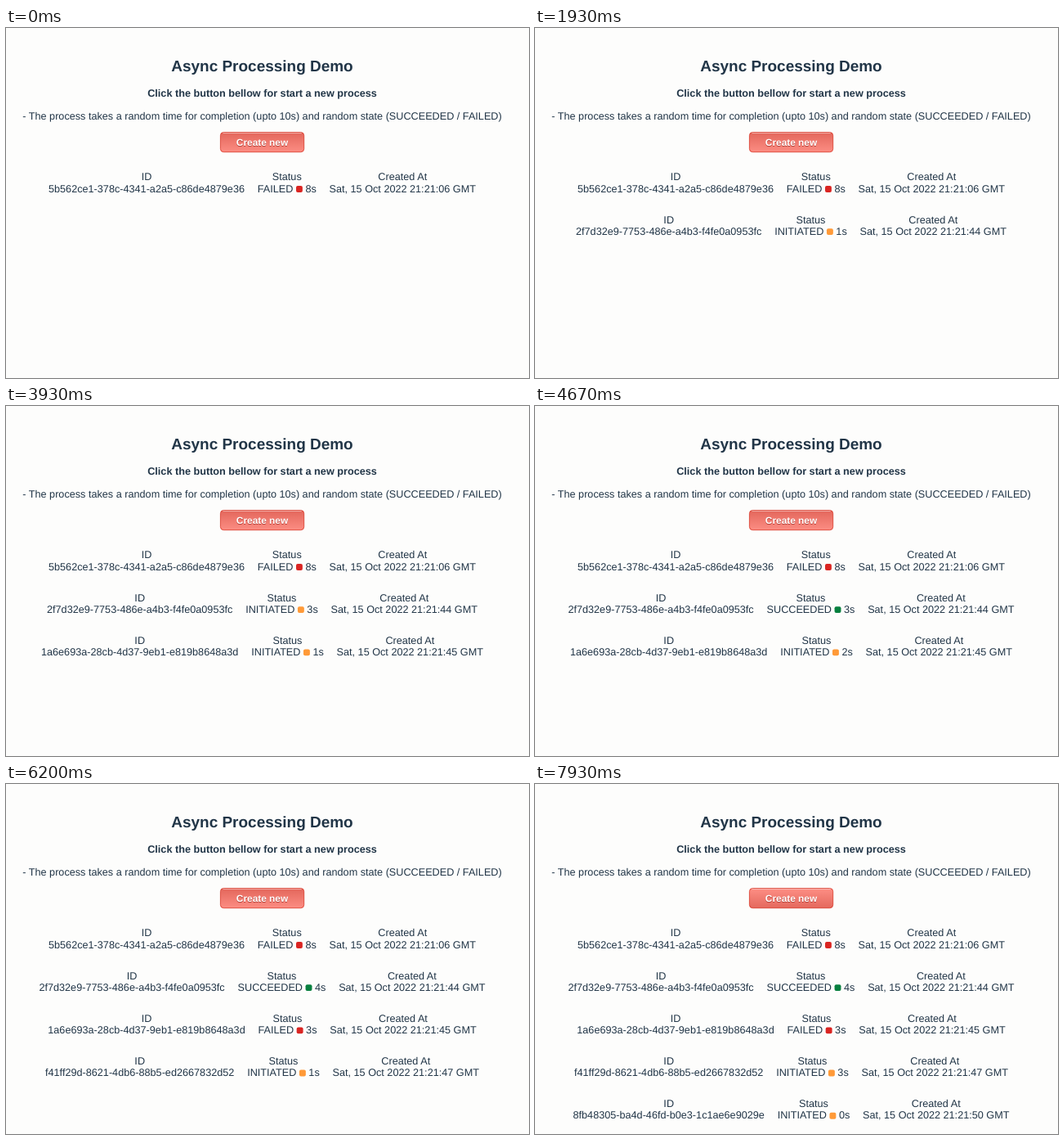
Animation of 640x428 px, one loop 8 s. Source, as an HTML page:

```html
<!DOCTYPE html>
<html lang="en">
<head>
<meta charset="utf-8">
<title>Async Processing Demo</title>
<style>
  html, body { margin: 0; width: 100%; height: 100%; overflow: hidden; background: #fdfdfc; }
  svg { display: block; width: 640px; height: 428px; }
  text {
    font: 12.66px "Liberation Sans", Arial, sans-serif;
    fill: #213547;
    text-rendering: geometricPrecision;
  }
  .mid { text-anchor: middle; }
  .bold { font-weight: 700; }
  .title { font-size: 18.98px; }
  .label { font-size: 11.86px; font-weight: 700; fill: #fff; }
  .shade { fill: #b23e35; }
</style>
</head>
<body>
<svg viewBox="0 0 640 428">
  <defs>
    <linearGradient id="idle" x1="0" y1="0" x2="0" y2="1">
      <stop offset=".05" stop-color="#fc8d83"/><stop offset="1" stop-color="#e4685d"/>
    </linearGradient>
    <linearGradient id="hover" x1="0" y1="0" x2="0" y2="1">
      <stop offset=".05" stop-color="#e4685d"/><stop offset="1" stop-color="#fc8d83"/>
    </linearGradient>
  </defs>
  <text class="mid bold title" x="313.5" y="53">Async Processing Demo</text>
  <text class="mid bold" x="313.5" y="84.3">Click the button bellow for start a new process</text>
  <text class="mid" x="313.5" y="111.6">- The process takes a random time for completion (upto 10s) and random state (SUCCEEDED / FAILED)</text>
  <rect id="button" x="262.4" y="127.5" width="102.3" height="24.2" rx="4" stroke="#d83526" stroke-width=".8"/>
  <path d="M265.5 128.4H361.6" stroke="#f7c5c0" stroke-width=".8"/>
  <text class="mid label shade" x="313.5" y="144.9">Create new</text>
  <text class="mid label" x="313.5" y="144.1">Create new</text>
  <g id="rows"></g>
</svg>
<script>
const LOOP = 8000, HOVER_END = 7930;
const CENTER = 313.5, GAP = 15.8, SPACE = 3.52, DOT = 7.9;
const TOP = 186.4, LINE = 14.23, PITCH = 52.18;
const COLORS = { INITIATED: '#ff9a38', FAILED: '#da2522', SUCCEEDED: '#08803f' };

// shown: first visible; ticks: times the seconds go up; done: time of the final state
const jobs = [
  { id: '5b562ce1-378c-4341-a2a5-c86de4879e36', at: '21:21:06', shown: 0, base: 8, ticks: [], done: 0, state: 'FAILED' },
  { id: '2f7d32e9-7753-486e-a4b3-f4fe0a0953fc', at: '21:21:44', shown: 1200, base: 0, ticks: [1930, 2930, 3930, 4930], done: 4070, state: 'SUCCEEDED' },
  { id: '1a6e693a-28cb-4d37-9eb1-e819b8648a3d', at: '21:21:45', shown: 2670, base: 0, ticks: [3670, 4670, 5670], done: 5200, state: 'FAILED' },
  { id: 'f41ff29d-8621-4db6-88b5-ed2667832d52', at: '21:21:47', shown: 4730, base: 0, ticks: [5730, 6730, 7730], done: Infinity },
  { id: '8fb48305-ba4d-46fd-b0e3-1c1ae6e9029e', at: '21:21:50', shown: 7130, base: 0, ticks: [], done: Infinity }
];

const pen = document.createElement('canvas').getContext('2d');
pen.font = '126.6px "Liberation Sans", Arial, sans-serif';
const width = s => pen.measureText(s).width / 10;

const text = (s, x, y, cls = '') => `<text class="${cls}" x="${x.toFixed(2)}" y="${y.toFixed(2)}">${s}</text>`;

function row(job, i, t) {
  const state = t >= job.done ? job.state : 'INITIATED';
  const secs = job.base + job.ticks.filter(k => t >= k).length + 's';
  const date = `Sat, 15 Oct 2022 ${job.at} GMT`;
  const idW = width(job.id), stateW = width(state), dateW = width(date);
  const statusW = stateW + SPACE * 2 + DOT + width(secs);
  const x1 = CENTER - (idW + statusW + dateW) / 2 - GAP;
  const x2 = x1 + idW + GAP;
  const x3 = x2 + statusW + GAP;
  const dotX = x2 + stateW + SPACE;
  const head = TOP + i * PITCH, y = head + LINE;
  return text('ID', x1 + idW / 2, head, 'mid')
    + text('Status', x2 + statusW / 2, head, 'mid')
    + text('Created At', x3 + dateW / 2, head, 'mid')
    + text(job.id, x1, y)
    + text(state, x2, y)
    + `<rect x="${dotX.toFixed(2)}" y="${(y - DOT + .3).toFixed(2)}" width="${DOT}" height="${DOT}" rx="2" fill="${COLORS[state]}"/>`
    + text(secs, dotX + DOT + SPACE, y)
    + text(date, x3, y);
}

const rows = document.getElementById('rows');
const button = document.getElementById('button');
let last = '';

function draw(t) {
  const html = jobs.map((job, i) => t >= job.shown ? row(job, i, t) : '').join('');
  if (html !== last) rows.innerHTML = last = html;
  button.setAttribute('fill', t < HOVER_END ? 'url(#hover)' : 'url(#idle)');
}

const start = performance.now();
function frame() {
  draw((performance.now() - start) % LOOP);
  requestAnimationFrame(frame);
}
frame();
</script>
</body>
</html>
```
